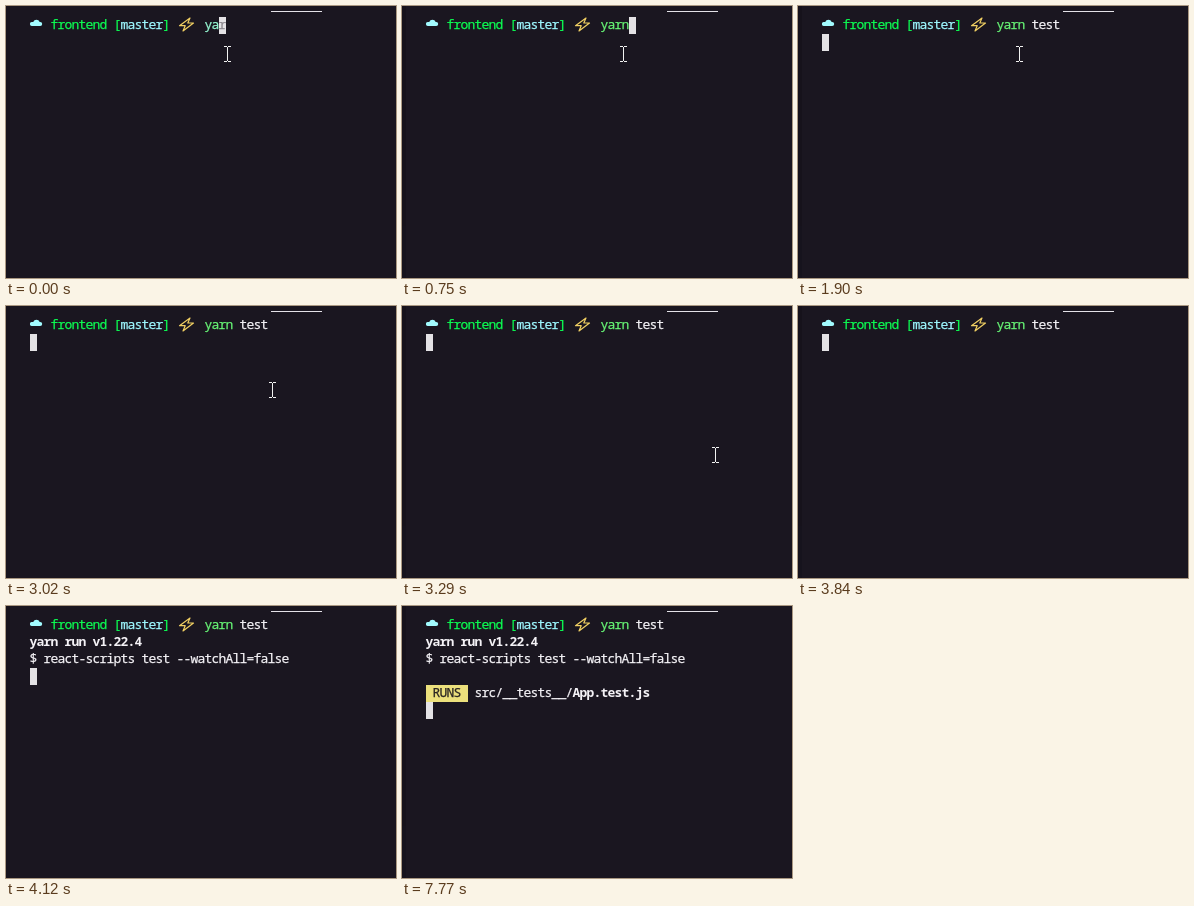
An HTML page for the animation above (8 s loop, 390 by 272 pixels).

```html
<!DOCTYPE html>
<html lang="en">
<head>
<meta charset="utf-8">
<title>Terminal test run</title>
<style>
  html, body { margin: 0; width: 100%; height: 100%; overflow: hidden; background: #1a1620; }
  svg { display: block; }
  /* 7.8px advance tightened to 7px columns */
  text {
    font-family: "Noto Sans Mono", "DejaVu Sans Mono", monospace;
    font-size: 13px; letter-spacing: -.8px; white-space: pre; stroke-width: .25px;
  }
  .bold { font-weight: 700; stroke: none; }
</style>
</head>
<body>
<svg id="stage" width="390" height="272" viewBox="0 0 390 272">
  <rect width="390" height="272" fill="#1a1620"/>
  <rect width="4" height="220" fill="#16121b"/>
  <rect y="220" width="4" height="52" fill="#16131d"/>
  <rect x="265" y="5" width="51" height="1" fill="#e4e2e8"/>
  <path d="M26 20a2 2 0 0 1-.2-4h1.400a3.500 3.500 0 0 1 6.500 0h.5a2 2 0 0 1 0 4z" fill="#a2fbff"/>
  <path d="M184 12 173.500 19.700h5.700L177 25l10.500-8h-5.700z" fill="none" stroke="#f0cf62" stroke-width="1.2" stroke-linejoin="round"/>
  <g id="screen"></g>
  <rect id="caret" width="7" height="17" fill="#e4e2e5"/>
  <g id="over"></g>
  <path id="mouse" fill="#f2f2f2" d="M0 0h3v1h1v-1h3v1h-3v14h3v1h-3v-1h-1v1h-3v-1h3v-14h-3z"/>
</svg>
<script>
const LOOP = 8000, COL = 7, ROW = 17, LEFT = 24, TOP = 11;
const WHITE = '#f4f2f6', GREEN = '#0cfb52', CYAN = '#9ef8ff', LIME = '#66f274', MINT = '#94f6d0';
const $ = id => document.getElementById(id);
const timed = [];

function make(tag, attrs, parent) {
  const el = document.createElementNS('http://www.w3.org/2000/svg', tag);
  for (const k in attrs) el.setAttribute(k, attrs[k]);
  parent.append(el);
  return el;
}

// Text on the character grid, visible from `start` until `end`
function put(col, row, str, fill, start = 0, end = LOOP, bold = false, parent = $('screen')) {
  const el = make('text', {
    x: LEFT + col * COL - .4, y: TOP + row * ROW + 12, fill, stroke: fill, class: bold ? 'bold' : ''
  }, parent);
  el.textContent = str;
  timed.push({ el, start, end });
}

put(3, 0, 'frontend', GREEN);
put(12, 0, '[', GREEN);
put(13, 0, 'master', CYAN);
put(19, 0, ']', GREEN);

put(25, 0, 'ya', MINT, 0, 600);
put(27, 0, 'r', '#8d8a90', 0, 600, false, $('over'));
put(25, 0, 'yar', LIME, 600);
put(28, 0, 'n', LIME, 750);
put(30, 0, 't', WHITE, 1030);
put(31, 0, 'es', WHITE, 1180);
put(33, 0, 't', WHITE, 1900);

put(0, 1, 'yarn run v1.22.4', WHITE, 3970, LOOP, true);
put(0, 2, '$ react-scripts test --watchAll=false', WHITE, 4120);

const badge = make('rect', { x: LEFT, y: TOP + 4 * ROW, width: 6 * COL, height: ROW, fill: '#ece07c' }, $('screen'));
timed.push({ el: badge, start: 7770, end: LOOP });
put(1, 4, 'RUNS', '#2a2522', 7770);
put(7, 4, 'src/__tests__/', WHITE, 7770);
put(21, 4, 'App.test.js', WHITE, 7770, LOOP, true);

// [time, column, row]
const caretSteps = [
  [0, 27, 0], [600, 28, 0], [750, 29, 0], [880, 30, 0], [1030, 31, 0],
  [1180, 33, 0], [1900, 0, 1], [3970, 0, 2], [4120, 0, 3], [7770, 0, 5]
];
// [time, x, y]; the pointer leaves the stage at the last step
const mouseSteps = [
  [0, 218, 40], [3020, 263, 76], [3140, 300, 123], [3290, 310, 141],
  [3440, 317, 176], [3570, 319, 222], [3690, 309, 255], [3840, 0, 300]
];

const stepAt = (steps, t) => steps.findLast(s => s[0] <= t);
const move = (el, x, y) => el.setAttribute('transform', `translate(${x} ${y})`);

function draw(now) {
  const t = now % LOOP;
  for (const { el, start, end } of timed)
    el.style.display = t >= start && t < end ? '' : 'none';
  const [, col, row] = stepAt(caretSteps, t);
  move($('caret'), LEFT + col * COL, TOP + row * ROW);
  const [, x, y] = stepAt(mouseSteps, t);
  move($('mouse'), x, y);
}

const origin = performance.now();
function tick() {
  draw(performance.now() - origin);
  requestAnimationFrame(tick);
}
tick();
</script>
</body>
</html>
```
